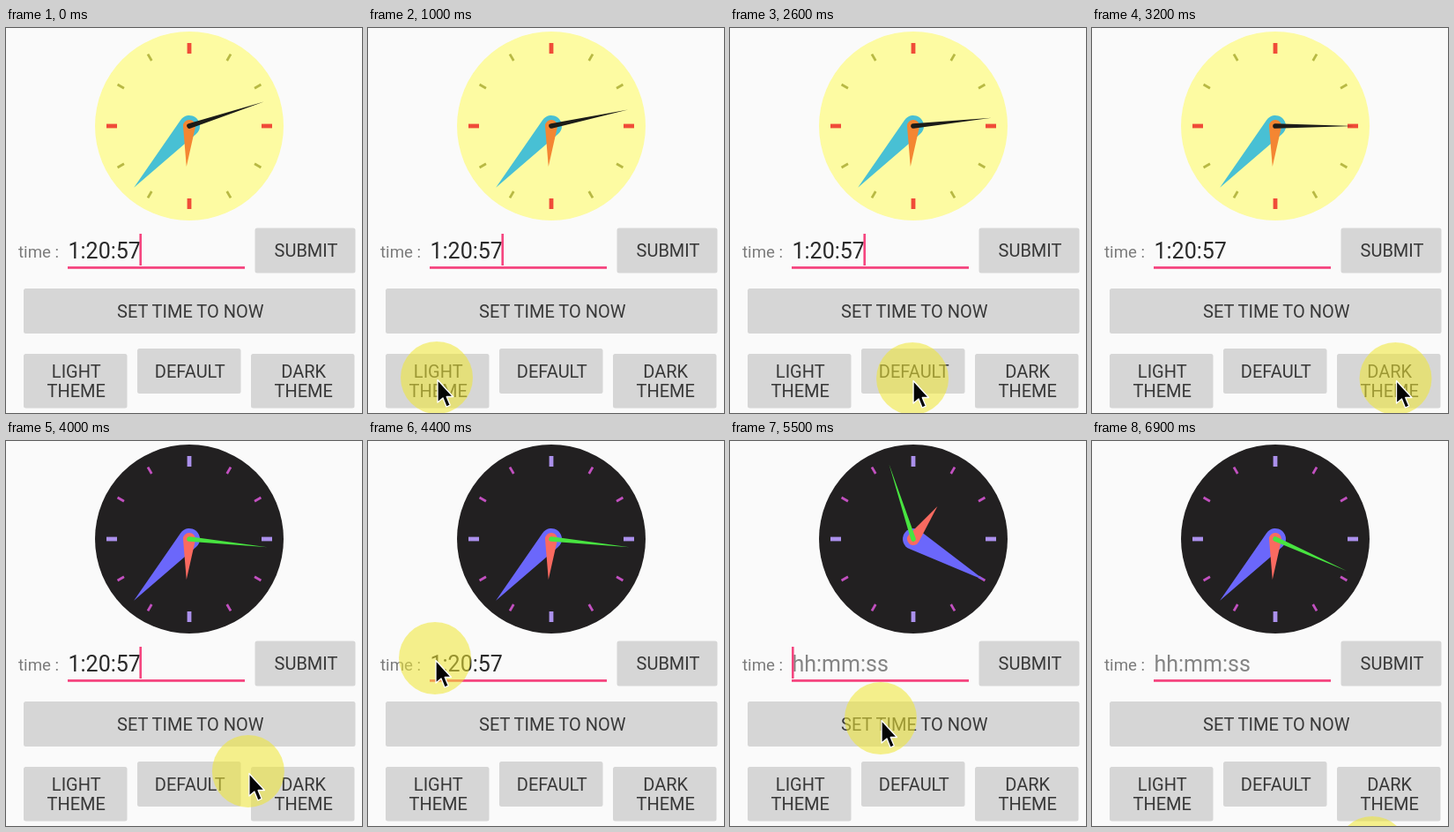
Animation of 404 by 436 pixels, one loop 7500 ms. Source, as an HTML page:

```html
<!DOCTYPE html>
<html lang="en">
<head>
<meta charset="utf-8">
<title>Clock themes</title>
<style>
  html, body { margin: 0; width: 100%; height: 100%; overflow: hidden; background: #fafafa; }
  svg { display: block; width: 100vw; height: 100vh; font-family: Roboto, Arial, sans-serif; }
  .button { fill: #d6d6d6; }
  .label { font-size: 20px; fill: #383838; text-anchor: middle; }
  .accent { fill: #f5457f; }
  #halo { fill: #f0e832; fill-opacity: .55; }
</style>
</head>
<body>
<svg viewBox="0 0 404 436">
  <rect width="404" height="436" fill="#fafafa"/>
  <g transform="translate(208 111)">
    <circle id="dial" r="107"/>
    <g id="ticks"></g>
    <path id="minute"/>
    <path id="hour"/>
    <path id="second"/>
  </g>
  <text x="14" y="260.4" font-size="18.7" fill="#7c7c7c">time :</text>
  <text id="field" x="70.5" y="261" font-size="25"></text>
  <rect class="accent" x="70" y="270" width="201" height="2.8"/>
  <rect class="accent" id="caret" y="233" width="2.6" height="36"/>
  <g id="buttons"></g>
  <circle id="halo" r="41"/>
  <path id="arrow" d="M0 0V25.5L6 20.5L10 30.5L14.2 28.6L10.2 19H17.5Z"
        fill="#050505" stroke="#fff" stroke-width="1.3" stroke-linejoin="round"/>
</svg>
<script>
const LOOP = 7500, STEP = 100;
const LIGHT_AT = 1300, DEFAULT_AT = 2500, DARK_AT = 3400, SUBMIT_AT = 5400, NOW_AT = 6100;
const $ = id => document.getElementById(id);

const themes = {
  standard: { dial: '#fdfba2', major: '#f04c38', minor: '#b8b944', minute: '#48c0d4', hour: '#f48632', second: '#1c1c18' },
  light: { dial: '#bbf6f6', major: '#6c50e2', minor: '#da66d8', minute: '#4644f4', hour: '#fa3a32', second: '#34e222' },
  dark: { dial: '#222021', major: '#ab90ec', minor: '#c250c0', minute: '#6b67fb', hour: '#fa6a60', second: '#48e440' }
};

// places where the pointer rests; bend bows the way there up or down
const stops = [
  { arrive: 0, leave: 400, x: 345, y: 480, bend: 0 },
  { arrive: 1000, leave: 1300, x: 78, y: 396, bend: -30 },
  { arrive: 2200, leave: 2500, x: 199, y: 397, bend: -2 },
  { arrive: 3200, leave: 3800, x: 344.5, y: 397, bend: 0 },
  { arrive: 4400, leave: 4600, x: 76, y: 246, bend: 21 },
  { arrive: 4900, leave: 5300, x: 299, y: 228, bend: 0 },
  { arrive: 5500, leave: 6100, x: 171, y: 314, bend: 0 },
  { arrive: 6900, leave: LOOP, x: 318, y: 466, bend: 100 }
];

function set(el, attrs) {
  for (const key in attrs) el.setAttribute(key, attrs[key]);
}

function add(parent, tag, attrs, text = '') {
  const el = document.createElementNS('http://www.w3.org/2000/svg', tag);
  set(el, attrs);
  el.textContent = text;
  return parent.appendChild(el);
}

function addButton(x, y, width, label) {
  const lines = label.split('\n'), gap = 22.5;
  const height = lines.length > 1 ? 61.5 : 51;
  add($('buttons'), 'rect', { class: 'button', x, y, width, height, rx: 2.5 });
  const baseline = y + height / 2 + 7.2 - (lines.length - 1) * gap / 2;
  lines.forEach((line, i) => add($('buttons'), 'text',
    { class: 'label', x: x + width / 2 + 1, y: baseline + i * gap }, line));
}

// round head joined by its tangents to a sharp tip
function teardrop(r, length) {
  const x = r * Math.sqrt(1 - (r / length) ** 2), y = -r * r / length;
  return `M0 ${-length}L${x} ${y}A${r} ${r} 0 1 1 ${-x} ${y}Z`;
}

const ticks = Array.from({ length: 12 }, (_, i) => {
  const kind = i % 3 ? 'minor' : 'major';
  const el = add($('ticks'), 'line', {
    y1: i % 3 ? -85.5 : -82, y2: -94, 'stroke-width': i % 3 ? 2.8 : 4.8,
    transform: `rotate(${i * 30})`
  });
  return { el, kind };
});

set($('minute'), { d: teardrop(12, 94) });
set($('hour'), { d: teardrop(7, 46) });
set($('second'), { d: teardrop(2.8, 89) });

addButton(282.5, 226.5, 114, 'SUBMIT');
addButton(20, 295, 376.5, 'SET TIME TO NOW');
['LIGHT\nTHEME', 'DEFAULT', 'DARK\nTHEME'].forEach((label, i) =>
  addButton(20 + i * 129, i === 1 ? 363 : 369, 117.5, label));

function pointerAt(t) {
  const i = stops.findIndex(s => t < s.leave);
  const to = stops[i], from = stops[i - 1] || to;
  if (t >= to.arrive) return to;
  const k = (t - from.leave) / (to.arrive - from.leave);
  const e = k * k * (3 - 2 * k);
  return {
    x: from.x + (to.x - from.x) * e,
    y: from.y + (to.y - from.y) * e + to.bend * 4 * e * (1 - e)
  };
}

function themeAt(t) {
  if (t >= DARK_AT) return themes.dark;
  return t >= LIGHT_AT && t < DEFAULT_AT ? themes.light : themes.standard;
}

function handsAt(t) {
  const submitted = t >= SUBMIT_AT && t < NOW_AT;
  const seconds = Math.floor((t + 300) / 1000) + (submitted ? 52 : 12);
  return { hour: submitted ? 36.5 : 184, minute: submitted ? 120 : 222, second: seconds * 6 };
}

function caretOn(t) {
  // submitting restarts the blink
  const phase = t < SUBMIT_AT ? t + 400 : t - SUBMIT_AT;
  return Math.floor(phase / 500) % 2 === 0;
}

function draw(time) {
  const t = Math.floor((time % LOOP) / STEP) * STEP;
  const theme = themeAt(t), hands = handsAt(Math.min(t, 6900));
  set($('dial'), { fill: theme.dial });
  ticks.forEach(({ el, kind }) => set(el, { stroke: theme[kind] }));
  for (const name in hands) set($(name), { fill: theme[name], transform: `rotate(${hands[name]})` });

  const empty = t >= SUBMIT_AT;
  $('field').textContent = empty ? 'hh:mm:ss' : '1:20:57';
  set($('field'), { fill: empty ? '#858585' : '#2a2a2a' });
  set($('caret'), {
    x: empty ? 70 : 151.4,
    visibility: caretOn(Math.min(t, 6900)) ? 'visible' : 'hidden'
  });

  const { x, y } = pointerAt(t);
  set($('halo'), { cx: x, cy: y });
  set($('arrow'), { transform: `translate(${x + 1} ${y + 2.5})` });
}

let start;
function loop(now) {
  start ??= now;
  draw(Math.max(0, now - start));
  requestAnimationFrame(loop);
}
draw(0);
requestAnimationFrame(loop);
</script>
</body>
</html>
```
